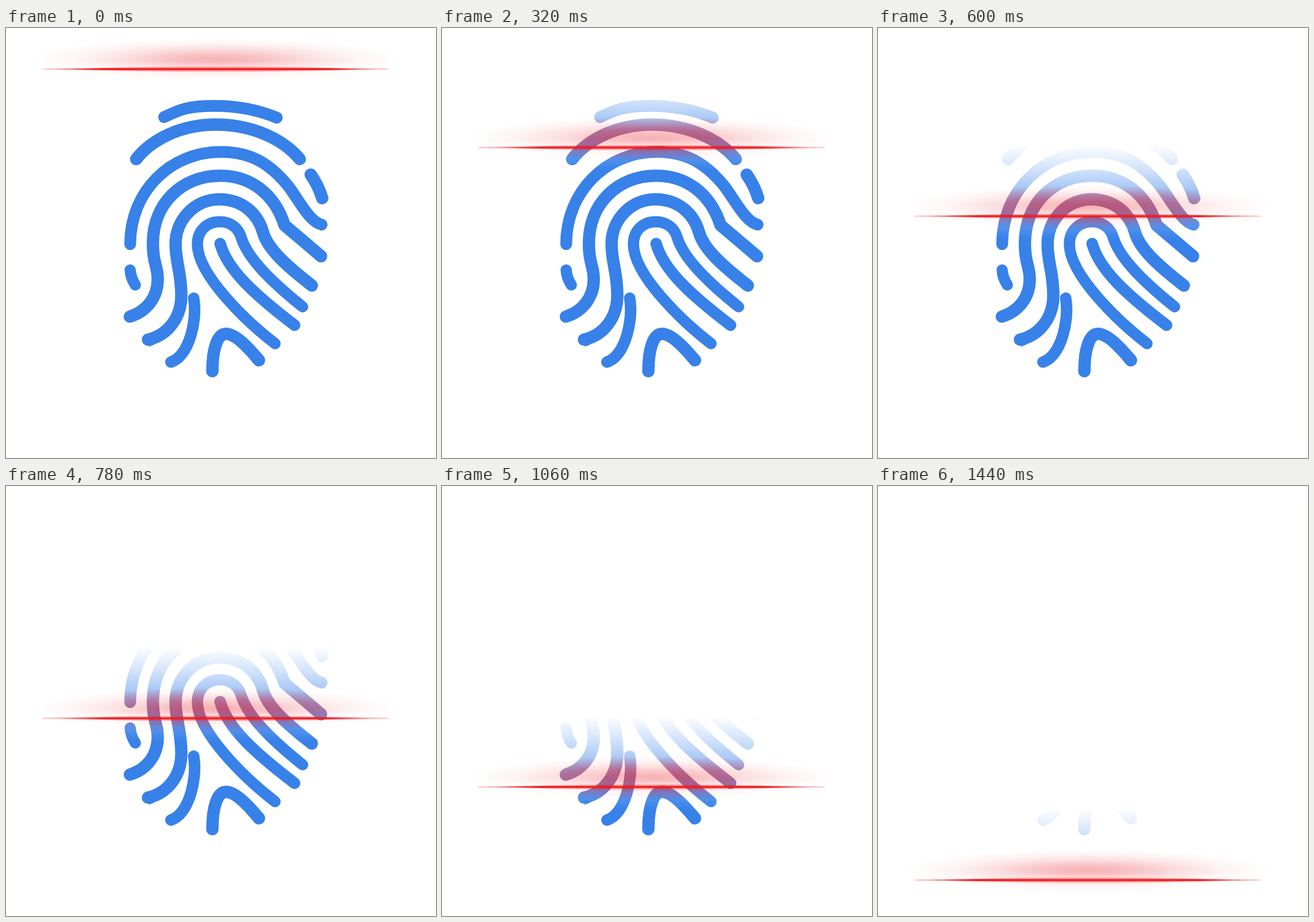
An HTML page for the animation above (1.46 s loop, 748x748 px).

```html
<!DOCTYPE html>
<html lang="en">
<head>
<meta charset="utf-8">
<title>Fingerprint scan</title>
<style>
  html, body { margin: 0; width: 100%; height: 100%; overflow: hidden; background: #fff; }
  svg { display: block; width: 100%; height: 100%; }
</style>
</head>
<body>
<svg viewBox="0 0 748 748">
  <defs>
    <linearGradient id="fade" gradientUnits="userSpaceOnUse" x1="0" y1="-124" x2="0" y2="40">
      <stop offset="0" stop-color="#3781e9" stop-opacity="0"/>
      <stop offset=".25" stop-color="#3781e9" stop-opacity=".22"/>
      <stop offset="1" stop-color="#3781e9"/>
    </linearGradient>
    <radialGradient id="tint" gradientUnits="userSpaceOnUse" cx="0" cy="0" r="1">
      <stop offset="0" stop-color="#d70f2a" stop-opacity=".42"/>
      <stop offset=".5" stop-color="#d70f2a" stop-opacity=".32"/>
      <stop offset=".8" stop-color="#d70f2a" stop-opacity=".13"/>
      <stop offset="1" stop-color="#d70f2a" stop-opacity="0"/>
    </radialGradient>
    <radialGradient id="glow" gradientUnits="userSpaceOnUse" cx="0" cy="0" r="1"
        gradientTransform="translate(366 -16) scale(320 38)">
      <stop offset="0" stop-color="#e8222a" stop-opacity=".36"/>
      <stop offset=".25" stop-color="#e8222a" stop-opacity=".28"/>
      <stop offset=".5" stop-color="#e8222a" stop-opacity=".15"/>
      <stop offset=".75" stop-color="#e8222a" stop-opacity=".05"/>
      <stop offset="1" stop-color="#e8222a" stop-opacity="0"/>
    </radialGradient>
    <radialGradient id="under" href="#glow" gradientTransform="translate(366 -16) scale(320 24)"/>
    <radialGradient id="spill" href="#glow" gradientTransform="translate(366 2) scale(300 20)"/>
    <linearGradient id="beam">
      <stop offset="0" stop-color="#ee1a1e" stop-opacity=".15"/>
      <stop offset=".08" stop-color="#ee1a1e" stop-opacity=".4"/>
      <stop offset=".18" stop-color="#ee1a1e"/>
      <stop offset=".82" stop-color="#ee1a1e"/>
      <stop offset=".92" stop-color="#ee1a1e" stop-opacity=".4"/>
      <stop offset="1" stop-color="#ee1a1e" stop-opacity=".15"/>
    </linearGradient>
    <g id="print" fill="none" stroke-width="21.5" stroke-linecap="round" stroke-linejoin="round">
      <path d="M275 155C300 143 315 135.5 362 135.5C405 135.5 440 143 471 156" stroke-width="20.5"/>
      <path d="M226.5 228C254 193 305 168 365 168C428 168 482 193 511 228"/>
      <path d="M216 376C216 285 285 215.5 374 215.5C432 215.5 464 242 491 275C512 303 528 337 549 342" stroke-width="20.5"/>
      <path d="M530 255Q544 275 550 296"/>
      <path d="M216 421Q217 435 225 447" stroke-width="19.5"/>
      <path d="M215.5 502C245 493 264 468 264 437C264 414 255.5 410 255.5 375C255.5 305 306 257 373 257C425 257 467 288 484.5 343L548 397"/>
      <path d="M247 542C280 535 305 505 305 465C305 425 295 408 295 376C295 332 330 298 371 298C411 298 438 323 447 355C455 385 490 415 532 448"/>
      <path d="M249 553V548L257 550Z" stroke-width="2"/>
      <path d="M468 549C420 512 333 430 333 376C333 352 350 337 372 337C390 337 404 347 409 364C420 400 460 440 516 485" stroke-width="19.5"/>
      <path d="M372.500 375C385 420 430 462 502 517" stroke-width="20"/>
      <path d="M326.500 470C333 505 320 570 287 581" stroke-width="20"/>
      <path d="M359 597C359 560 367 532 383 532C400 532 425 560 440 578"/>
    </g>
  </defs>
  <use href="#print" stroke="url(#fade)"/>
  <use href="#print" stroke="url(#tint)"/>
  <g id="scan">
    <rect x="46" y="-54" width="640" height="38" fill="url(#glow)"/>
    <rect x="46" y="-16" width="640" height="24" fill="url(#under)"/>
    <rect x="66" y="2" width="600" height="20" fill="url(#spill)" opacity=".25"/>
    <ellipse cx="364.500" rx="270" ry="4" fill="url(#beam)" opacity=".45"/>
    <rect x="63" y="-1.5" width="603" height="3" fill="url(#beam)"/>
  </g>
</svg>
<script>
  const LOOP = 1460, STEP = 20, TOP = 71.5, SPEED = 0.4264;
  const [fade, tint, scan] = ['fade', 'tint', 'scan'].map(id => document.getElementById(id));

  function draw() {
    const t = Math.floor(performance.now() % LOOP / STEP) * STEP;
    const y = TOP + SPEED * t;
    fade.setAttribute('gradientTransform', `translate(0 ${y})`);
    tint.setAttribute('gradientTransform', `translate(366 ${y - 15}) scale(330 38)`);
    scan.setAttribute('transform', `translate(0 ${y})`);
    requestAnimationFrame(draw);
  }
  draw();
</script>
</body>
</html>
```
